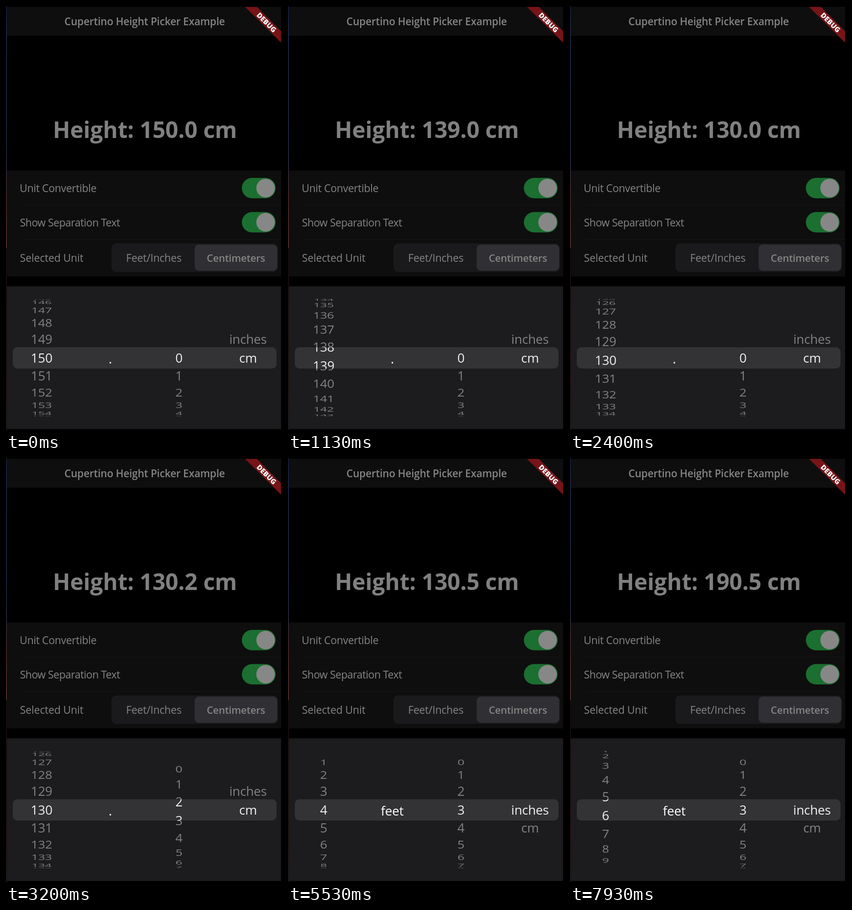
Recreate the animation shown at these times as an HTML page. Size 605 by 925 pixels, loop 8 s.

```html
<!DOCTYPE html>
<html lang="en">
<head>
<meta charset="utf-8">
<title>Height picker</title>
<style>
  html, body { margin: 0; width: 100%; height: 100%; overflow: hidden; background: #000; }
  svg { display: block; width: 605px; height: 925px; }
  text { font-family: "Open Sans", "Noto Sans", sans-serif; font-size: 23px; fill: #858585; }
  .mid, .wheel text { text-anchor: middle; }
  .title { font-size: 22.5px; font-weight: 600; letter-spacing: -.16px; fill: #858585; }
  .height { font-size: 49.5px; font-weight: 700; letter-spacing: -.1px; fill: #808080; }
  .debug { font-size: 15.5px; font-weight: 800; fill: #fff; }
  .wheel text, .sep { font-size: 28px; letter-spacing: -.25px; }
  .dim text { fill: #828284; }
  .lit text { fill: #f0f0f0; }
  .sep { fill: #fff; }
</style>
</head>
<body>
<svg viewBox="0 0 605 925" xmlns="http://www.w3.org/2000/svg">
  <defs>
    <linearGradient id="edge" x1="0" y1="0" x2="0" y2="1">
      <stop offset="0" stop-color="#1a2444"/>
      <stop offset=".08" stop-color="#26325c"/>
      <stop offset=".35" stop-color="#2a3050"/>
      <stop offset=".45" stop-color="#5a3032"/>
      <stop offset=".57" stop-color="#6a3c38"/>
      <stop offset=".572" stop-color="#1c1210"/>
      <stop offset=".9" stop-color="#2a1512"/>
      <stop offset="1" stop-color="#222"/>
    </linearGradient>
    <clipPath id="band"><rect x="15" y="745" width="578" height="46"/></clipPath>
    <clipPath id="rest"><path d="M0 639H605V745H0ZM0 791H605V897H0Z"/></clipPath>
    <g id="switch">
      <rect x="517" y="375" width="74" height="44.500" rx="22.250" fill="#1b6f30"/>
      <circle cx="569" cy="397.250" r="20.300" fill="#878787"/>
    </g>
  </defs>

  <rect width="605" height="925"/>
  <rect width="1.500" height="925" fill="url(#edge)"/>
  <rect x="2" y="2" width="601" height="63" fill="#0e0e0e"/>
  <text class="title mid" x="304" y="42">Cupertino Height Picker Example</text>

  <path d="M524 2H550L603 55V80Z" fill="#761418"/>
  <text class="debug mid" transform="translate(571 36) rotate(45)" y="5.500">DEBUG</text>

  <text class="height mid" id="height" x="304.500" y="288"></text>

  <rect x="2" y="359" width="601" height="231" fill="#0e0e0e"/>
  <path d="M34 434.500H603M34 509.500H603" stroke="#171718"/>
  <text x="30" y="406" letter-spacing="-.35">Unit Convertible</text>
  <text x="30.500" y="481" letter-spacing="-.52">Show Separation Text</text>
  <text x="30.500" y="558" letter-spacing="-.15">Selected Unit</text>
  <use href="#switch"/>
  <use href="#switch" y="74.500"/>
  <rect x="231" y="518" width="365" height="62" rx="11" fill="#1a1a1c"/>
  <rect x="413.500" y="520.500" width="181" height="57" rx="9" fill="#303034"/>
  <text class="mid" x="324" y="558" letter-spacing="-.2">Feet/Inches</text>
  <text class="mid" x="504" y="558" style="font-size:22px;font-weight:600;letter-spacing:-.25px">Centimeters</text>

  <rect x="2" y="611.500" width="601" height="311.500" fill="#1c1c1e"/>
  <rect x="15" y="744.500" width="578" height="46.500" rx="10" fill="#333336"/>
  <g id="dim" class="wheel dim" clip-path="url(#rest)"></g>
  <g id="lit" class="wheel lit" clip-path="url(#band)"></g>
  <text class="sep mid" id="sep" x="228.500" y="780"></text>
</svg>

<script>
const LOOP = 8000, STEP = 1000 / 15;
const CENTER = 767.5, RADIUS = 135, ANGLE = .303, SLOTS = 11;
const $ = id => document.getElementById(id);

// [ms, wheel position]
const cmKeys = [[533, 150], [667, 148.4], [1133, 138.57], [1433, 132.6], [1733, 129.12],
  [1930, 128.8], [2200, 129.65], [2667, 130]];
const mmKeys = [[2867, 0], [3200, 2.42], [3467, 3.25], [3867, 3.7], [4133, 4.76], [4267, 4.8], [4600, 5]];
const unitKeys = [[5133, 1], [5533, 0]];
const feetKeys = [[7133, 4], [7533, 5], [7733, 5], [7933, 5.69], [8000, 5.9]];

// Cubic interpolation that never overshoots its keys
function track(keys, t) {
  const last = keys.length - 1;
  if (t <= keys[0][0]) return keys[0][1];
  if (t >= keys[last][0]) return keys[last][1];
  const slope = i => i < 0 || i >= last ? 0 : (keys[i + 1][1] - keys[i][1]) / (keys[i + 1][0] - keys[i][0]);
  const tangent = i => {
    const a = slope(i - 1), b = slope(i);
    return a * b > 0 ? 2 * a * b / (a + b) : 0;
  };
  const i = keys.findIndex(k => k[0] > t) - 1;
  const [t0, y0] = keys[i], [t1, y1] = keys[i + 1];
  const d = t1 - t0, u = (t - t0) / d, v = 1 - u;
  return y0 * (1 + 2 * u) * v * v + y1 * u * u * (3 - 2 * u)
    + d * u * v * (v * tangent(i) - u * tangent(i + 1));
}

function makeWheel(x) {
  const layers = ["dim", "lit"].map(id => Array.from({ length: SLOTS }, () => {
    const el = document.createElementNS("http://www.w3.org/2000/svg", "text");
    el.setAttribute("y", 10);
    return $(id).appendChild(el);
  }));
  return (pos, label) => {
    const first = Math.round(pos) - (SLOTS - 1) / 2;
    for (let i = 0; i < SLOTS; i++) {
      const n = first + i, a = (n - pos) * ANGLE, cos = Math.cos(a);
      const depth = 1 + .065 * (1 - cos);
      const y = CENTER + RADIUS * Math.sin(a) / depth;
      const sx = 1 / (1 + .12 * (1 - cos));
      for (const layer of layers) {
        layer[i].textContent = Math.abs(a) < Math.PI / 2 ? label(n) : "";
        layer[i].setAttribute("transform", `translate(${x} ${y}) scale(${sx} ${Math.max(cos, .01) / depth})`);
      }
    }
  };
}

const left = makeWheel(78), right = makeWheel(379), unit = makeWheel(530.5);
const range = (min, max) => n => n >= min && n <= max ? String(n) : "";
const unitName = n => ["inches", "cm"][n] || "";

function draw(t) {
  const unitPos = track(unitKeys, t), feetPos = track(feetKeys, t);
  const cmPos = track(cmKeys, t), mmPos = track(mmKeys, t);
  const metric = unitPos > .5;
  unit(unitPos, unitName);
  if (metric) {
    left(cmPos, range(0, 300));
    right(mmPos, range(0, 9));
  } else {
    left(feetPos, range(1, 9));
    right(3, range(0, 11));
  }
  $("sep").textContent = metric ? "." : "feet";
  const feet = Math.round(feetPos);
  const cm = feet > 4 ? (feet * 12 + 3) * 2.54 : Math.round(cmPos) + Math.round(mmPos) / 10;
  $("height").textContent = `Height: ${cm.toFixed(1)} cm`;
}

// The screen refreshes fifteen times a second
function tick() {
  const t = performance.now() % LOOP;
  draw(Math.floor((t + 4) / STEP) * STEP);
  requestAnimationFrame(tick);
}
tick();
</script>
</body>
</html>
```
